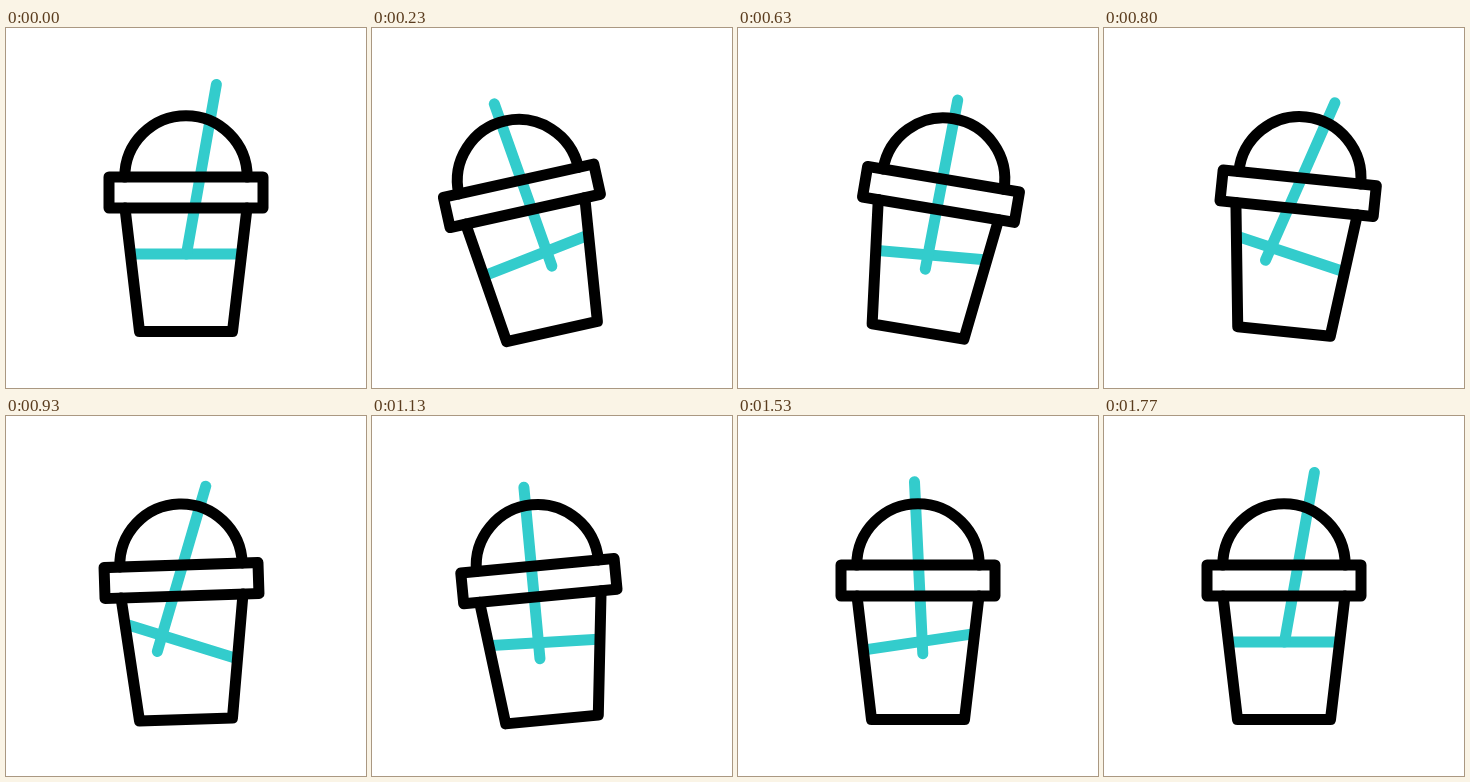
Write an HTML page with a canvas that moves like this. It is 360x360 px and loops after 2 s.

```html
<!DOCTYPE html>
<html lang="en">
<head>
<meta charset="utf-8">
<title>Iced drink</title>
<style>
html, body { margin: 0; width: 100%; height: 100%; overflow: hidden; background: #fff; }
canvas { display: block; width: 360px; height: 360px; }
</style>
</head>
<body>
<canvas id="stage"></canvas>
<script>
const LOOP = 2000, FPS = 30;
const TEAL = '#33cccc', INK = '#000';
const canvas = document.getElementById('stage');
const ctx = canvas.getContext('2d');
const dpr = window.devicePixelRatio || 1;
canvas.width = canvas.height = 360 * dpr;

// Keys are [tick, value], eased in and out between neighbours.
const cupTilt = [[1, 0], [8.2, -13.5], [20, 10], [32, -6], [42.3, 0]];
const surfaceTilt = [[0, 0], [13.3, -16.5], [28, 19], [40, -15], [53, 0]];
const strawTilt = [[0, 10], [12, -17.3], [26, 20], [40, -12.9], [53, 10]];
const strawX = [[0, 180.5], [12, 202.2], [26, 151.5], [40, 188.2], [53, 180.5]];
const strawY = [[0, 226], [12, 247.9], [26, 233.8], [40, 247.1], [53, 226]];

function at(keys, t) {
  if (t <= keys[0][0]) return keys[0][1];
  for (let i = 1; i < keys.length; i++) {
    const [t0, v0] = keys[i - 1], [t1, v1] = keys[i];
    if (t < t1) {
      const p = (t - t0) / (t1 - t0);
      return v0 + (v1 - v0) * p * p * (3 - 2 * p);
    }
  }
  return keys[keys.length - 1][1];
}

function turn(deg, x, y) {
  ctx.translate(x, y);
  ctx.rotate(deg * Math.PI / 180);
}

function line(x0, y0, x1, y1) {
  ctx.beginPath();
  ctx.moveTo(x0, y0);
  ctx.lineTo(x1, y1);
  ctx.stroke();
}

function cupPath() {
  ctx.beginPath();
  ctx.moveTo(119, 180);
  ctx.lineTo(133.5, 303.5);
  ctx.lineTo(226.5, 303.5);
  ctx.lineTo(241, 180);
}

function drawSurface(t) {
  ctx.save();
  cupPath();
  ctx.clip();
  turn(at(surfaceTilt, t), 180, 226);
  line(-80, 0, 80, 0);
  ctx.restore();
}

function drawStraw(t) {
  ctx.save();
  turn(at(strawTilt, t), at(strawX, t), at(strawY, t));
  line(0, 0, 0, -172.2);
  ctx.restore();
}

function drawCup() {
  cupPath();
  ctx.stroke();
  ctx.beginPath();
  ctx.arc(180, 149, 61.2, Math.PI, 0);
  ctx.stroke();
  ctx.strokeRect(103, 149, 154, 31);
}

function draw(t) {
  ctx.setTransform(dpr, 0, 0, dpr, 0, 0);
  ctx.fillStyle = '#fff';
  ctx.fillRect(0, 0, 360, 360);
  ctx.lineWidth = 11;
  ctx.lineCap = ctx.lineJoin = 'round';
  turn(at(cupTilt, t), 180, 303.5);
  ctx.translate(-180, -303.5);
  ctx.strokeStyle = TEAL;
  drawSurface(t);
  drawStraw(t);
  ctx.strokeStyle = INK;
  drawCup();
}

const start = performance.now();
function tick() {
  const ms = (performance.now() - start) % LOOP;
  draw(Math.floor((ms + 4) * FPS / 1000));
  requestAnimationFrame(tick);
}
tick();
</script>
</body>
</html>
```
